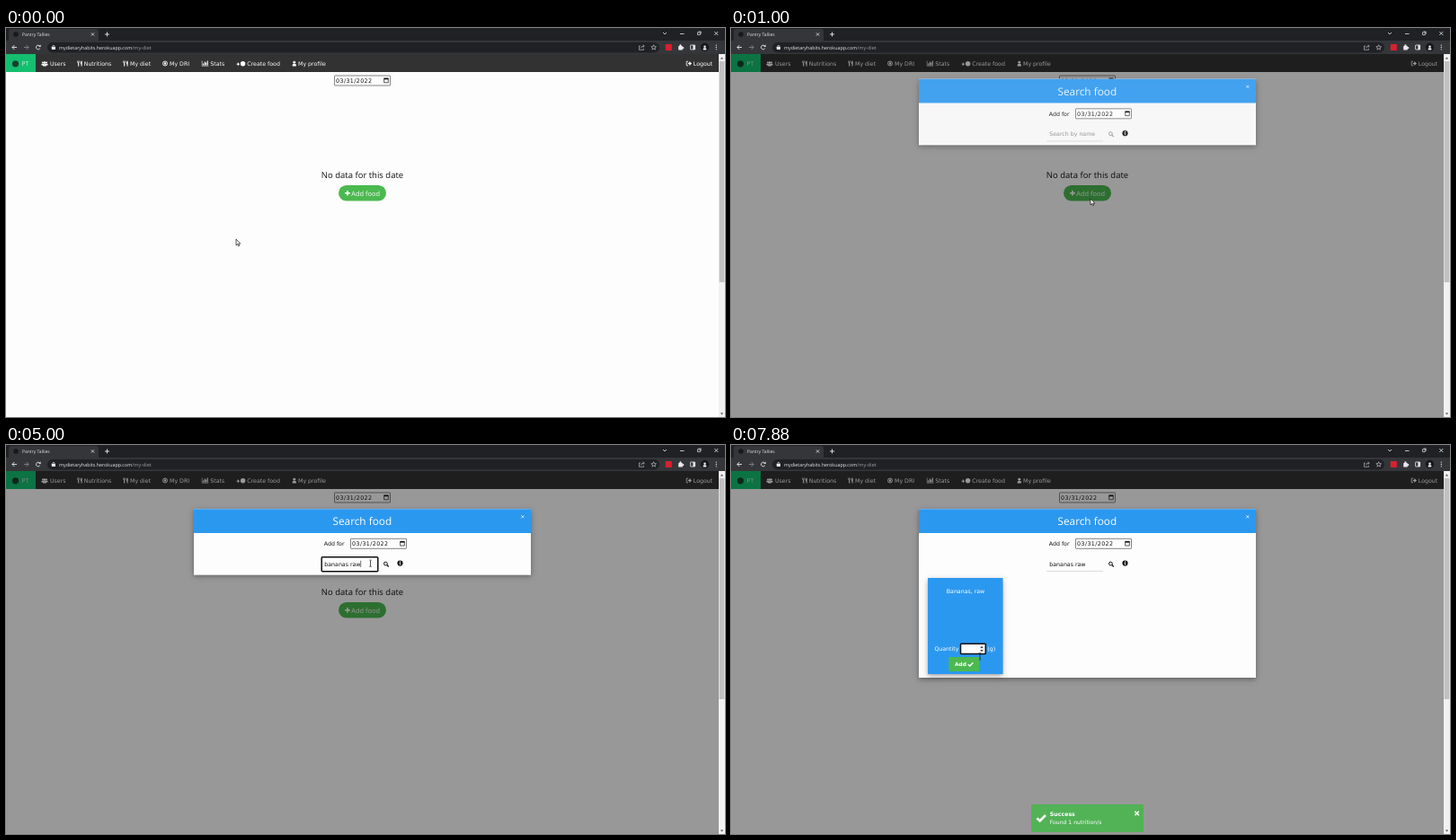
Write an HTML page with a canvas that moves like this. It is 800 by 433 pixels and loops after 8 s.

```html
<!DOCTYPE html>
<html lang="en">
<head>
<meta charset="utf-8">
<title>Pantry Tallies</title>
<style>
html, body { margin: 0; width: 100%; height: 100%; overflow: hidden; background: #fefdfe; }
canvas { display: block; width: 800px; height: 433px; }
</style>
</head>
<body>
<canvas id="stage" width="800" height="433"></canvas>
<script>
const c = document.getElementById('stage').getContext('2d');
const LOOP = 8000, STEP = 125;
const SANS = '"DejaVu Sans", Verdana, sans-serif';
const UI = '"Open Sans", "Segoe UI", sans-serif';
const PAPER = '#fefdfe', BLUE = '#2b98f0', GREEN = '#4bb950', BAR = '#35363a', DARK = '#202124';

const OPEN = 750, FOCUS = 1740, SEARCH = 5463, FOUND = 6250, TOAST = 6360, HOVER = 7120, EDIT = 7870;
const KEYS = [2370, 2620, 2870, 3120, 3370, 3500, 3740, 4120, 4370, 4500, 4740];
const QUERY = 'bananas raw';

// time, x, y
const PATH = [
  [120, 256, 235], [620, 400, 190], [1050, 400, 190], [1620, 381, 129], [4800, 381, 129],
  [5200, 430, 134], [6280, 430, 134], [6700, 322, 195], [6980, 322, 195],
  [7480, 266, 243], [7740, 266, 243], [7870, 277, 235]
];

const clamp = v => Math.max(0, Math.min(1, v));
const smooth = v => v * v * (3 - 2 * v);

function rect(x, y, w, h, fill, r = 0) {
  c.fillStyle = fill;
  c.beginPath();
  c.roundRect(x, y, w, h, r);
  c.fill();
}
function frame(x, y, w, h, color, lw = 1, r = 0) {
  c.strokeStyle = color;
  c.lineWidth = lw;
  c.beginPath();
  c.roundRect(x, y, w, h, r);
  c.stroke();
}
function dot(x, y, r, fill) {
  c.fillStyle = fill;
  c.beginPath();
  c.arc(x, y, r, 0, 7);
  c.fill();
}
function arc(x, y, r, color, lw, from = 0, to = Math.PI * 2) {
  c.strokeStyle = color;
  c.lineWidth = lw;
  c.beginPath();
  c.arc(x, y, r, from, to);
  c.stroke();
}
function trace(pts) {
  c.beginPath();
  for (let i = 0; i < pts.length; i += 2) c.lineTo(pts[i], pts[i + 1]);
}
function line(color, lw, ...pts) {
  c.strokeStyle = color;
  c.lineWidth = lw;
  trace(pts);
  c.stroke();
}
function poly(fill, ...pts) {
  c.fillStyle = fill;
  trace(pts);
  c.fill();
}
function text(s, x, y, size, color, font = SANS, align = 'left', weight = '') {
  c.font = `${weight} ${size}px ${font}`;
  c.textAlign = align;
  c.fillStyle = color;
  c.fillText(s, x, y);
}
function at(x, y, draw) {
  c.save();
  c.translate(x, y);
  draw();
  c.restore();
}
function cross(x, y, r, color, lw) {
  line(color, lw, x - r, y - r, x + r, y + r);
  line(color, lw, x + r, y - r, x - r, y + r);
}
function plus(x, y, r, color, lw) {
  line(color, lw, x - r, y, x + r, y);
  line(color, lw, x, y - r, x, y + r);
}
function check(x, y, s, color) {
  line(color, s * 0.55, x - s, y, x - s * 0.3, y + s * 0.65, x + s, y - s * 0.7);
}
function shadowBox(x, y, w, h, fill) {
  c.save();
  c.shadowOffsetY = 1.7;
  c.shadowColor = 'rgba(0,0,0,.2)';
  c.shadowBlur = 4;
  rect(x, y, w, h, fill);
  c.shadowColor = 'rgba(0,0,0,.19)';
  c.shadowBlur = 8;
  rect(x, y, w, h, fill);
  c.restore();
}

function person(x, y, s, color) {
  dot(x, y - s, s * 0.85, color);
  rect(x - s * 1.25, y, s * 2.5, s * 1.5, color, [s * 0.8, s * 0.8, s * 0.3, s * 0.3]);
}
function magnifier(x, y, color) {
  arc(x - 0.6, y - 0.6, 1.9, color, 1);
  line(color, 1.2, x + 0.8, y + 0.8, x + 2.8, y + 2.8);
}

function browser() {
  const ink = '#e8eaed';
  rect(0, 0, 800, 14, DARK);
  rect(3, 1, 100, 14, BAR, [3, 3, 0, 0]);
  rect(0, 14, 800, 15, BAR);
  dot(11, 7, 2.8, '#17191b');
  text('Pantry Tallies', 18, 8.9, 5, ink, UI);
  cross(96.5, 7, 1.6, ink, 0.8);
  plus(112.5, 7, 2.5, ink, 0.9);
  line(ink, 0.8, 731, 5, 733, 7, 735, 5);
  line(ink, 0.8, 750, 6.5, 754.5, 6.5);
  frame(769.5, 4.8, 2.8, 2.8, ink, 0.7);
  line(ink, 0.7, 770.6, 4, 773.2, 4, 773.2, 6.7);
  cross(790.3, 6, 2, ink, 0.8);

  line(ink, 0.9, 12, 21.5, 7, 21.5);
  line(ink, 0.9, 9.4, 19, 6.9, 21.5, 9.4, 24);
  line('#85878b', 0.9, 20, 21.5, 25, 21.5);
  line('#85878b', 0.9, 22.6, 19, 25.1, 21.5, 22.6, 24);
  arc(35.8, 21.5, 2.3, ink, 0.9, 0.5, 5.6);
  poly(ink, 38.6, 18.5, 38.6, 21, 36.1, 21);

  rect(46, 16, 681, 11.5, DARK, 5.7);
  rect(50.8, 20.8, 4.2, 3.2, ink, 0.4);
  arc(52.9, 20.6, 1.2, ink, 0.7, Math.PI, 0);
  text('mydietaryhabits.herokuapp.com', 59, 23.7, 5.35, ink, UI);
  text('/my-diet', 140.3, 23.7, 5.5, '#9aa0a6', UI);
  line('#b6b9bd', 0.7, 706, 20, 704.5, 20, 704.5, 24.3, 709.5, 24.3, 709.5, 23);
  line('#b6b9bd', 0.7, 706.3, 22.5, 707.5, 20.5, 710, 20.2);
  line('#b6b9bd', 0.7, 708.6, 18.6, 710.3, 20.2, 708.6, 21.8);
  const star = [];
  for (let i = 0; i <= 10; i++) {
    const a = i * Math.PI / 5 - Math.PI / 2, r = i % 2 ? 1.3 : 3;
    star.push(720.7 + r * Math.cos(a), 21.7 + r * Math.sin(a));
  }
  line('#d5d7da', 0.6, ...star);
  rect(733.8, 18, 7, 7, '#d9202f');
  rect(748.2, 20, 4.6, 4.6, ink, 0.6);
  dot(750.4, 19.4, 1.1, ink);
  dot(753.2, 22.2, 1.1, ink);
  frame(761.6, 19, 5, 5, ink, 0.8, 0.4);
  rect(764.4, 19, 2.3, 5, ink);
  dot(777.5, 21.5, 4.7, '#17181b');
  person(777.5, 22.3, 1.5, ink);
  for (const y of [19.2, 21.5, 23.8]) dot(790.3, y, 0.65, ink);
}

function scrollbar() {
  rect(793, 29, 7, 404, '#f1f1f1');
  rect(793.6, 37, 5.8, 246, '#c1c1c1');
  poly('#505050', 794.8, 34.5, 796.5, 32.5, 798.2, 34.5);
  poly('#505050', 794.8, 428.5, 796.5, 430.5, 798.2, 428.5);
}

function cutlery(x, y) {
  for (const i of [-2.4, -1.3, -0.2]) line('#fff', 0.6, x + i, y - 3, x + i, y - 0.5);
  line('#fff', 1.1, x - 1.3, y - 0.8, x - 1.3, y + 3);
  poly('#fff', x + 1, y + 0.7, x + 1.2, y - 2.2, x + 2.6, y - 3, x + 2.6, y + 3, x + 1.6, y + 3, x + 1.6, y + 0.7);
}

function nav() {
  const y = 39.5, label = (s, x) => text(s, x, 41.8, 6.25, '#fff');
  rect(0, 29, 793, 20, '#323232');
  rect(0, 29, 33, 20, '#14bf70');
  dot(10.5, y + 0.3, 3.6, '#17402d');
  text('PT', 17.5, 42, 6.6, '#d9f5e6', UI);
  person(40.9, y + 0.2, 1.2, '#fff');
  person(45.1, y + 0.2, 1.2, '#fff');
  person(43, y + 0.7, 1.6, '#fff');
  label('Users', 49);
  cutlery(82, y);
  label('Nutritions', 86.7);
  cutlery(133, y);
  label('My diet', 138);
  arc(177, y, 2.5, '#fff', 0.9);
  dot(177, y, 1.2, '#fff');
  label('My DRI', 182);
  line('#fff', 0.6, 218.2, 36.5, 218.2, 42.2, 225.4, 42.2);
  [2, 4, 3, 5].forEach((h, i) => rect(219.2 + i * 1.5, 41.6 - h, 1.1, h, '#fff'));
  label('Stats', 227.3);
  plus(258.3, 40.2, 1.7, '#fff', 1);
  dot(263.6, y + 0.2, 2.7, '#fff');
  label('Create food', 268.3);
  person(320.8, y + 0.4, 1.7, '#fff');
  label('My profile', 325);
  line('#fff', 0.8, 759, 37.2, 757.2, 37.2, 757.2, 41.8, 759, 41.8);
  line('#fff', 1.3, 758.8, y, 761, y);
  poly('#fff', 760.3, 37, 763, y, 760.3, 42);
  label('Logout', 764.8);
}

function dateField(x, y) {
  rect(x, y, 62, 11, PAPER, 0.5);
  frame(x, y, 62, 11, '#767676', 0.9, 0.5);
  c.letterSpacing = '0.4px';
  text('03/31/2022', x + 1.6, y + 7.9, 6.3, '#111');
  c.letterSpacing = '0px';
  frame(x + 55.2, y + 3.4, 4.6, 4.4, '#111', 0.7);
  rect(x + 55, y + 2.6, 5, 1.7, '#111');
}

function page() {
  rect(0, 29, 793, 404, PAPER);
  nav();
  dateField(365.5, 53);
  text('No data for this date', 396.5, 167.2, 9.5, '#111', UI, 'center');
  rect(370, 175, 53, 17.6, GREEN, 8.8);
  plus(380, 183.8, 2.8, '#fff', 1.6);
  text('Add food', 384.3, 186.6, 7.4, '#fff', UI);
}

function searchRow(t) {
  const typed = KEYS.filter(k => k <= t).length;
  const value = QUERY.slice(0, typed);
  const focused = t >= FOCUS && t < SEARCH - 90;
  if (value) text(value, 354.3, 134.8, 6.25, '#111');
  else text('Search by name', 354.3, 134.8, 6.25, '#8a8a8a');
  if (focused) {
    frame(351.2, 124.7, 62.6, 16, '#111', 1.5, 1);
    const last = typed ? KEYS[typed - 1] : FOCUS;
    if ((t - last) % 1000 < 500) {
      c.font = `6.25px ${SANS}`;
      const x = 354.6 + c.measureText(value).width;
      line('#111', 0.6, x, 128.7, x, 136);
    }
  } else {
    line('#ccc', 0.7, 351, 140.4, 414, 140.4);
  }
  if (t >= 5100 && t < FOUND + 60) rect(414, 124.3, 19, 16, '#c8c8c8');
  magnifier(423, 132.7, typed ? '#111' : '#999');
  dot(438.5, 131.6, 3.1, '#111');
  rect(438, 129.4, 1.2, 1, '#fff');
  line('#fff', 0.9, 437.6, 131.3, 438.6, 131.3, 438.6, 133.6);
}

function spinner(t) {
  at(396.5, 223.5, () => {
    c.rotate((t - SEARCH) / 2000 * Math.PI * 2);
    const q = Math.PI / 4;
    arc(0, 0, 21.7, '#f3f3f3', 6.6);
    arc(0, 0, 21.7, '#3498e2', 6.6, -3 * q, -q);
    arc(0, 0, 21.7, '#0404ee', 6.6, q, 3 * q);
  });
}

function card(t) {
  const hot = t >= HOVER, edit = t >= EDIT, ink = hot ? '#fff' : '#111';
  shadowBox(219, 148, 83.3, 107, hot ? BLUE : PAPER);
  text('Bananas, raw', 261, 164.6, 6.25, ink, SANS, 'center');
  text('Quantity', 226.4, 229.2, 6.25, ink);
  rect(255.5, 221.2, 27.8, 11.4, PAPER, 0.5);
  frame(255.5, 221.2, 27.8, 11.4, edit ? '#111' : '#767676', edit ? 1.5 : 0.9, 0.8);
  if (edit) {
    rect(276.6, 222.4, 5, 9, '#efefef');
    poly('#444', 277.4, 226, 279, 223.8, 280.6, 226);
    poly('#444', 277.4, 228, 279, 230.2, 280.6, 228);
  }
  text('(g)', 285.3, 229.2, 6.25, ink);
  rect(242.3, 236, 34, 16, GREEN);
  text('Add', 249, 246.3, 5.8, '#fff', SANS, 'left', 'bold');
  check(266.6, 244.2, 2.8, '#fff');
}

function modal(t) {
  c.fillStyle = 'rgba(0,0,0,.4)';
  c.fillRect(0, 29, 793, 404);
  const p = clamp((t - OPEN) / 400), k = 1 - Math.pow(1 - p, 2.2);
  if (!p) return;
  const loading = t >= SEARCH && t < FOUND;
  const bottom = loading ? 320.5 : t >= FOUND ? 259 : 144.6;
  c.save();
  c.beginPath();
  c.rect(0, 29, 793, 404);
  c.clip();
  c.globalAlpha = k;
  c.translate(0, -125 * (1 - k));
  shadowBox(209, 71.3, 375, bottom - 71.3, PAPER);
  rect(209, 71.3, 375, 26.7, BLUE);
  text('Search food', 396.3, 89.4, 11.8, '#fff', UI, 'center');
  cross(574.8, 79.8, 1.5, '#fff', 0.8);
  text('Add for', 353.8, 112.2, 6.25, '#111');
  dateField(383.5, 104.3);
  searchRow(t);
  if (loading) spinner(t);
  if (t >= FOUND) card(t);
  c.restore();
}

function toast(t) {
  c.save();
  c.globalAlpha = clamp((t - TOAST) / 250);
  rect(334, 400, 125, 31, '#52b256', 0.8);
  check(345.2, 415.4, 4.8, '#fff');
  text('Success', 354.8, 412.6, 6.25, '#fff', SANS, 'left', 'bold');
  text('Found 1 nutrition/s', 354.8, 422.2, 6.1, '#fff');
  cross(451.6, 410, 2.2, '#fff', 1.6);
  c.restore();
}

function arrow() {
  const pts = [0, 0, 0, 6.9, 1.6, 5.5, 2.6, 7.8, 3.7, 7.3, 2.7, 5.1, 4.8, 5.1, 0, 0];
  poly('#fff', ...pts);
  line('#111', 0.7, ...pts);
}
function beam() {
  line('#222', 0.8, 0, -3, 0, 3.5);
  line('#222', 0.6, -1.3, -3.4, 1.3, -3.4);
  line('#222', 0.6, -1.3, 3.9, 1.3, 3.9);
}
function hand() {
  const pts = [0, 0, 1.1, 0, 1.3, 3, 4.6, 3.8, 4.8, 6, 3.8, 8.8, 0.4, 8.8, -2, 5.6, -1.4, 4.8, 0, 5.8, 0, 0];
  poly('#fff', ...pts);
  line('#111', 0.7, ...pts);
}

function pointer(t) {
  let i = PATH.findIndex(p => p[0] > t);
  if (i < 0) i = PATH.length;
  const a = PATH[Math.max(0, i - 1)], b = PATH[Math.min(i, PATH.length - 1)];
  const k = b[0] > a[0] ? smooth(clamp((t - a[0]) / (b[0] - a[0]))) : 0;
  const x = a[1] + (b[1] - a[1]) * k, y = a[2] + (b[2] - a[2]) * k;
  let shape = arrow;
  if (t < OPEN) {
    if (x > 370 && y < 193) shape = hand;
  } else if (t < SEARCH) {
    if (y > 124 && y < 141 && x > 351) shape = x < 414 ? beam : hand;
  } else if (t < FOUND + 60 || (x < 276 && y > 236)) {
    shape = hand;
  } else if (t >= EDIT) {
    shape = beam;
  }
  at(x, y, shape);
}

function draw(now) {
  const t = Math.floor(now % LOOP / STEP) * STEP;
  c.textRendering = 'geometricPrecision';
  page();
  if (t >= OPEN) modal(t);
  if (t >= TOAST) toast(t);
  browser();
  scrollbar();
  pointer(t);
}

const start = performance.now();
function tick() {
  draw(performance.now() - start);
  requestAnimationFrame(tick);
}
tick();
</script>
</body>
</html>
```
